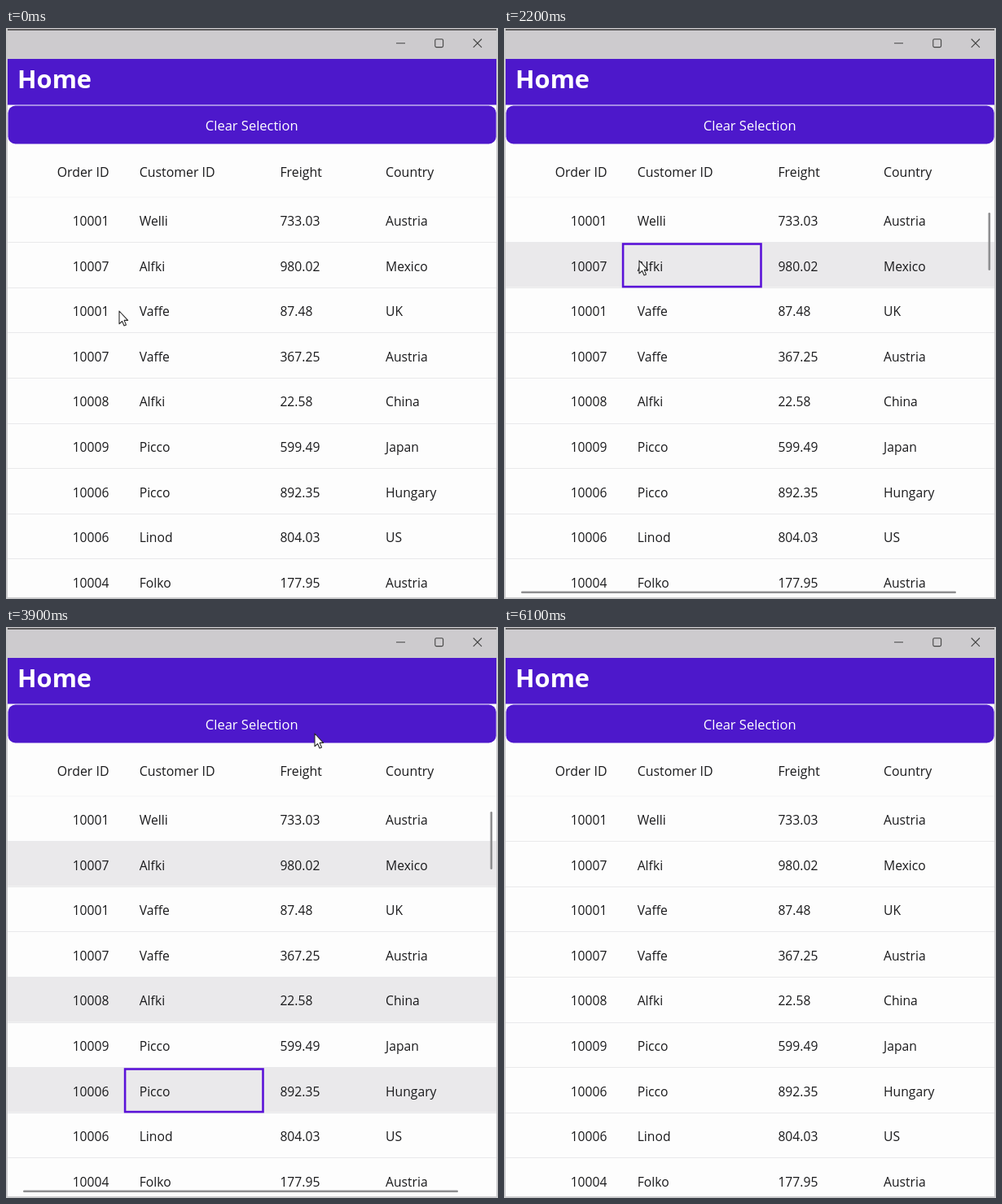
An HTML page that plays this animation: 604x702 px, repeating every 6200 ms.

```html
<!DOCTYPE html>
<html lang="en">
<head>
<meta charset="utf-8">
<title>Orders</title>
<style>
  html, body { margin: 0; width: 100%; height: 100%; overflow: hidden; background: #fdfdfd; }
  svg { display: block; width: 604px; height: 702px; }
  text { font: 15.7px "Open Sans", "Noto Sans", sans-serif; fill: #1a1a1c; }
  .title { font-size: 30.8px; font-weight: 700; fill: #fff; }
  .button { font-size: 16.5px; fill: #fff; }
  .header { font-size: 15.9px; }
</style>
</head>
<body>
<svg id="stage" viewBox="0 0 604 702"></svg>
<script>
const LOOP = 6200, STEP = 100;
const TOP = 208, PITCH = 55.6;
const PURPLE = '#4d18cb';

const headers = ['Order ID', 'Customer ID', 'Freight', 'Country'];
const columns = [126.5, 163.7, 336.4, 466];
const orders = [
  '10001 Welli 733.03 Austria',
  '10007 Alfki 980.02 Mexico',
  '10001 Vaffe 87.48 UK',
  '10007 Vaffe 367.25 Austria',
  '10008 Alfki 22.58 China',
  '10009 Picco 599.49 Japan',
  '10006 Picco 892.35 Hungary',
  '10006 Linod 804.03 US',
  '10004 Folko 177.95 Austria'
];

// Row index and the time of its click
const clicks = [[1, 2200], [4, 2900], [6, 3500]];
const CLEAR = 4300, BARS_ON = 1500, BARS_OFF = 5800, LEAVE = 5700;

// Pointer path: time, x, y
const path = [
  [0, 139, 348], [700, 139, 350], [1300, 58, 571], [1500, 64, 557],
  [2100, 166, 286], [2400, 166, 286], [2800, 164, 440], [3000, 165, 446],
  [3400, 174, 588], [3600, 175, 582], [3900, 379, 131],
  [4200, 366, 116], [4400, 365, 115], [5100, 365, 115], [5700, 602, 118]
];

const stage = document.getElementById('stage');

function add(tag, attrs, content) {
  const el = document.createElementNS('http://www.w3.org/2000/svg', tag);
  for (const key in attrs) el.setAttribute(key, attrs[key]);
  if (content) el.textContent = content;
  return stage.appendChild(el);
}
const rect = (x, y, width, height, fill, more) =>
  add('rect', { x, y, width, height, fill, ...more });
const label = (x, y, content, more) => add('text', { x, y, ...more }, content);
const show = (el, on) => el.setAttribute('visibility', on ? 'visible' : 'hidden');
const rowTop = row => Math.floor(TOP + PITCH * row);

function cells(values, y, more) {
  values.forEach((value, i) =>
    label(columns[i], y, value, { 'text-anchor': i ? 'start' : 'end', ...more }));
}

// Window chrome
rect(0, 0, 604, 702, '#fdfdfd');
rect(0, 0, 604, 38, '#cdcbce');
rect(2, 1.5, 601, 1.2, '#161616');
add('path', {
  d: 'M479 18.8H490M573.7 13.5L584 23.8M584 13.5L573.7 23.8',
  stroke: '#444', 'stroke-width': 1.1, fill: 'none'
});
rect(526.8, 13.8, 9.8, 9.8, 'none', { rx: 1.5, stroke: '#444', 'stroke-width': 1.1 });
rect(2, 38, 600, 56.5, PURPLE);
label(14, 74, 'Home', { class: 'title' });
rect(2.5, 95.6, 599.2, 46.8, PURPLE, { rx: 9 });
label(301.7, 125.7, 'Clear Selection', { class: 'button', 'text-anchor': 'middle' });

// Grid
const fills = clicks.map(([row]) =>
  rect(2, rowTop(row), 600, PITCH, '#eae9eb'));
cells(headers, 183, { class: 'header' });
rect(2, TOP - 0.5, 600, 1, '#f4f4f5');
orders.forEach((order, i) => {
  rect(2, rowTop(i + 1), 600, 1, '#e9e9eb');
  cells(order.split(' '), Math.round(TOP + PITCH * i + 35));
});
const frames = clicks.map(([row]) =>
  rect(146.1, Math.round(TOP + PITCH * row) + 1.5, 169.4, 52.6, 'none',
    { stroke: '#5a12d8', 'stroke-width': 2.6 }));

const bars = [
  rect(594.5, 227, 2.6, 71, '#8f8f91', { rx: 1.3 }),
  rect(21, 692.5, 534, 2.6, '#8f8f91', { rx: 1.3 })
];
const pointer = add('path', {
  d: 'M0 0V15.8L3.6 12.5L6 18L8.5 17L6.1 11.4H10.6Z',
  fill: '#fff', stroke: '#2b2b2b', 'stroke-width': 1.1, 'stroke-linejoin': 'round'
});

// Window border
add('path', { d: 'M1 0V701H603V0', stroke: '#c9c9cb', 'stroke-width': 2, fill: 'none' });

function pointerAt(t) {
  const i = path.findIndex(p => p[0] > t);
  if (i < 0) return path[path.length - 1].slice(1);
  const [t0, x0, y0] = path[i - 1], [t1, x1, y1] = path[i];
  const u = (t - t0) / (t1 - t0), k = u * u * (3 - 2 * u);
  return [x0 + (x1 - x0) * k, y0 + (y1 - y0) * k];
}

function draw(now) {
  const t = Math.floor((now % LOOP) / STEP) * STEP;
  clicks.forEach(([, at], i) => {
    const next = i + 1 < clicks.length ? clicks[i + 1][1] : CLEAR;
    show(fills[i], t >= at && t < CLEAR);
    show(frames[i], t >= at && t < next);
  });
  bars.forEach(bar => show(bar, t >= BARS_ON && t < BARS_OFF));
  show(pointer, t < LEAVE);
  pointer.setAttribute('transform', `translate(${pointerAt(t)})`);
}

const start = performance.now();
function tick() {
  draw(performance.now() - start);
  requestAnimationFrame(tick);
}
tick();
</script>
</body>
</html>
```
